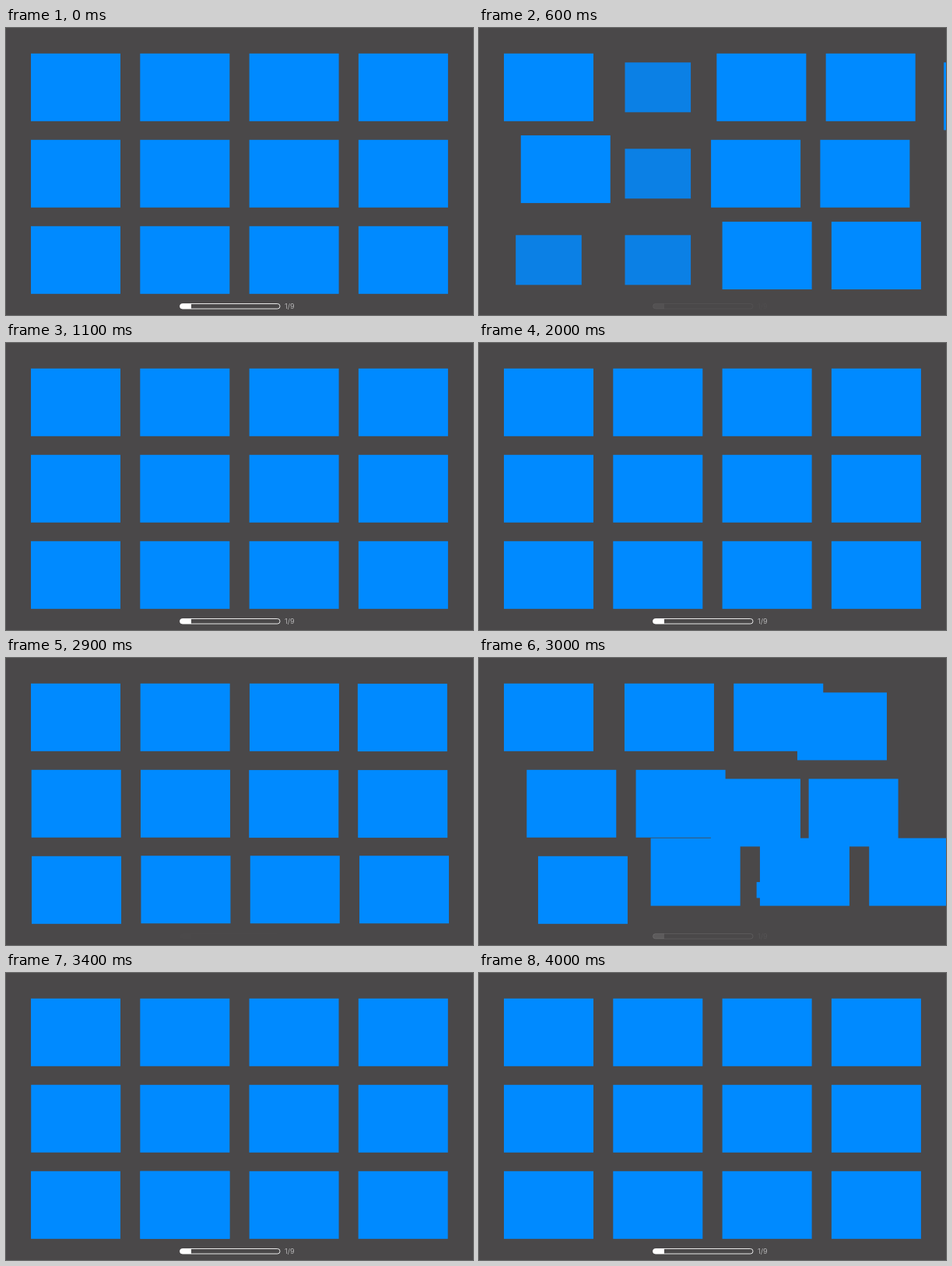
Write an HTML page with a canvas that moves like this. It is 600 px wide and 369 px high and loops after 5600 ms.

```html
<!DOCTYPE html>
<html lang="en">
<head>
<meta charset="utf-8">
<title>Grid shuffle</title>
<style>
  html, body { margin: 0; overflow: hidden; background: #4a4849; }
  canvas { display: block; }
</style>
</head>
<body>
<canvas id="stage" width="600" height="369"></canvas>
<script>
const ctx = document.getElementById('stage').getContext('2d');
const LOOP = 5600, STEP = 100, W = 115, H = 87;

const slot = i => ({ x: 32 + 140.3 * (i % 4), y: 32.8 + 111 * Math.floor(i / 4) });
const shift = (i, dx, dy) => ({ x: slot(i).x + dx, y: slot(i).y + dy });
const move = (a, b) => [slot(a), slot(b)];
const keep = [0, 1, 2, 3, 4, 5, 6, 7];

// Tiles leave four slots, the rest close up and new ones slide in.
const closeUp = {
  start: 518, duration: 512,
  scaled: [1, 5, 8, 9],
  scale: t => Math.max(0, 1 - 1.65 * t),
  alpha: t => Math.max(0, 1 - 0.9 * t),
  paths: [0, 2, 3, 4, 6, 7, 10, 11].map((from, to) => move(from, to))
    .concat([8, 9, 10, 11].map(i => [shift(i, 596, -222), slot(i)]))
};

// New tiles grow between the others, which make room for them.
const makeRoom = {
  start: 2881, duration: 528,
  scaled: [1, 5, 8, 10],
  scale: (t, p) => 0.145 + 0.855 * p,
  alpha: () => 1,
  paths: [[0, 0], [1, 2], [2, 3], [3, 4], [4, 6], [5, 7], [6, 9], [8, 11], [7, 9]]
    .map(([from, to]) => move(from, to))
    .concat([9, 10, 11].map(i => [slot(i), shift(i, 463, -222)]))
};

// cubic-bezier(.42, 0, .58, 1)
function ease(t) {
  let lo = 0, hi = 1;
  for (let i = 0; i < 24; i++) {
    const s = (lo + hi) / 2, r = 1 - s;
    const x = 1.26 * s * r * r + 1.74 * s * s * r + s * s * s;
    if (x < t) lo = s; else hi = s;
  }
  return lo * lo * (3 - 2 * lo);
}

function tile({ x, y }, k = 1) {
  ctx.fillRect(x + W * (1 - k) / 2, y + H * (1 - k) / 2, W * k, H * k);
}

function drawPhase(phase, t, p) {
  ctx.globalAlpha = phase.alpha(t);
  for (const i of phase.scaled) tile(slot(i), phase.scale(t, p));
  ctx.globalAlpha = 1;
  for (const [a, b] of phase.paths) {
    tile({ x: a.x + (b.x - a.x) * p, y: a.y + (b.y - a.y) * p });
  }
}

function drawBar(alpha) {
  ctx.save();
  ctx.globalAlpha = alpha;
  ctx.fillStyle = '#b4b3b4';
  ctx.font = '9px Inter, sans-serif';
  ctx.textBaseline = 'alphabetic';
  ctx.fillText('1/9', 358, 361.3);
  ctx.beginPath();
  ctx.roundRect(223.5, 354.5, 128.5, 6.5, 3.25);
  ctx.strokeStyle = '#e8e8e8';
  ctx.stroke();
  ctx.clip();
  ctx.fillStyle = '#fff';
  ctx.fillRect(223, 354, 15, 8);
  ctx.restore();
}

function draw(ms) {
  ctx.fillStyle = '#4a4849';
  ctx.fillRect(0, 0, 600, 369);
  ctx.fillStyle = '#008aff';
  const phase = [closeUp, makeRoom].find(f => ms > f.start && ms < f.start + f.duration);
  if (phase) {
    const t = (ms - phase.start) / phase.duration, p = ease(t);
    drawPhase(phase, t, p);
    drawBar(p);
  } else {
    for (let i = 0; i < 12; i++) tile(slot(i));
    drawBar(1);
  }
}

let begin;
function frame(now) {
  begin ??= now;
  draw(Math.floor((now - begin) % LOOP / STEP) * STEP);
  requestAnimationFrame(frame);
}
draw(0);
requestAnimationFrame(frame);
</script>
</body>
</html>
```
